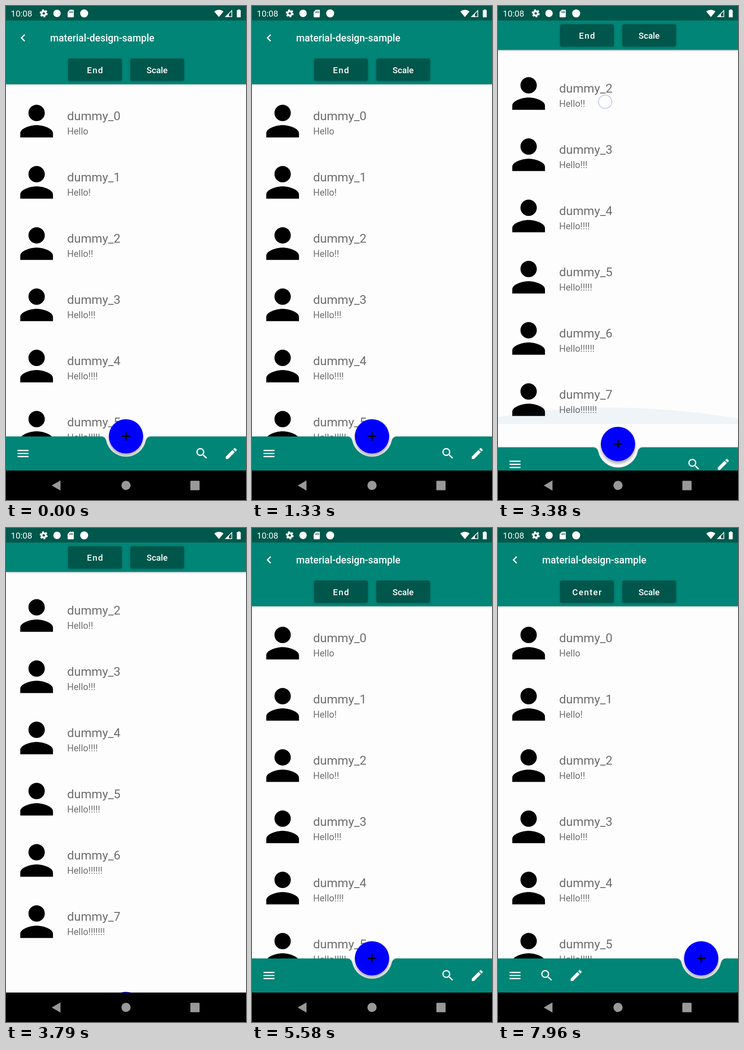
An HTML page that plays this animation: 522x1073 px, repeating every 8000 ms.

```html
<!DOCTYPE html>
<html lang="en">
<head>
<meta charset="utf-8">
<title>Material design sample</title>
<style>
  html, body { margin: 0; width: 100%; height: 100%; overflow: hidden; background: #000; }
  svg { display: block; width: 100%; height: 100%; font-family: Roboto, sans-serif; }
  .medium { font-weight: 500; fill: #fff; }
  .name { font-size: 26.67px; fill: #6e6e6e; }
  .note { font-size: 20px; fill: #6e6e6e; }
</style>
</head>
<body>
<svg viewBox="0 0 522 1073">
  <defs>
    <path id="person" d="M12 12c2.21 0 4-1.79 4-4s-1.79-4-4-4-4 1.79-4 4 1.79 4 4 4zm0 2c-2.67 0-8 1.34-8 4v2h16v-2c0-2.66-5.33-4-8-4z"/>
    <filter id="blur" x="-30%" y="-30%" width="160%" height="160%"><feGaussianBlur stdDeviation="2.6"/></filter>
    <filter id="lift" x="-5%" y="-20%" width="110%" height="140%">
      <feDropShadow dx="0" dy="1" stdDeviation="2" flood-opacity=".26"/>
    </filter>
  </defs>

  <rect width="522" height="1073" fill="#fdfdfd"/>
  <g id="list"></g>
  <path id="bottomGlow" d="M0 908V893Q240 850 522 896V908Z" fill="#006ea0"/>
  <path id="topGlow" d="M0 170V174Q261 194 522 174V170Z" fill="#006ea0"/>

  <g id="fabShadow"><circle cy="5" r="38" opacity=".27" filter="url(#blur)"/></g>
  <g id="bar">
    <path id="barShape" fill="#008577" filter="url(#lift)"/>
    <g fill="#fff">
      <path transform="translate(21 956) scale(1.333)" d="M3 18h18v-2H3v2zm0-5h18v-2H3v2zm0-7v2h18V6H3z"/>
      <g id="menu">
        <path transform="translate(410 956) scale(1.333)" d="M15.5 14h-.79l-.28-.27A6.47 6.47 0 0 0 16 9.5 6.5 6.5 0 1 0 9.5 16c1.61 0 3.09-.59 4.23-1.57l.27.28v.79l5 4.99L20.49 19l-4.99-5zm-6 0a4.5 4.5 0 1 1 0-9 4.5 4.5 0 0 1 0 9z"/>
        <path transform="translate(474 956) scale(1.333)" d="M3 17.25V21h3.75L17.81 9.94l-3.75-3.75L3 17.25zM20.71 7.04a1 1 0 0 0 0-1.41l-2.34-2.34a1 1 0 0 0-1.41 0l-1.83 1.83 3.75 3.75 1.83-1.83z"/>
      </g>
    </g>
  </g>
  <g id="fab">
    <circle r="37.3" fill="#00f"/>
    <path d="M-9.3 0H9.3M0-9.3V9.3" stroke="#000" stroke-width="2.67"/>
  </g>

  <g id="header">
    <rect y="20" width="522" height="150" fill="#008577" filter="url(#lift)"/>
    <path transform="translate(21 53.3) scale(1.333)" fill="#fff" d="M15.41 7.41 14 6l-6 6 6 6 1.41-1.41L10.83 12z"/>
    <text class="medium" x="96" y="77" font-size="21.33">material-design-sample</text>
    <g fill="#00574b" filter="url(#lift)">
      <rect x="135" y="114" width="117" height="48.5" rx="4"/>
      <rect x="270.3" y="114" width="117" height="48.5" rx="4"/>
    </g>
    <g class="medium" font-size="18.67" text-anchor="middle">
      <text id="mode" x="194.3" y="145.6" letter-spacing="1.67"></text>
      <text x="328.6" y="145.6">Scale</text>
    </g>
  </g>

  <rect width="522" height="31.5" fill="#00574b"/>
  <g fill="#fff">
    <text x="10.5" y="23" font-size="18.67">10:08</text>
    <g fill="none" stroke="#fff">
      <circle cx="82" cy="16" r="4.6" stroke-width="4"/>
      <circle cx="82" cy="16" r="7" stroke-width="3.4" stroke-dasharray="3.9 3.43"/>
    </g>
    <circle cx="111" cy="16" r="8"/>
    <path d="M139 8H146Q147.5 8 147.5 9.500V23Q147.500 24.500 146 24.500H135.500Q134 24.500 134 23V13Z"/>
    <path d="M139 11.500V15M141.800 11.500V15M144.600 11.500V15" stroke="#00574b" stroke-width="1.5"/>
    <circle cx="170" cy="16" r="8.7"/>
    <path d="M463 24 453 12Q463 4.500 473 12Z"/>
    <path d="M478 23.200 491.200 10V23.200Z" fill="none" stroke="#fff" stroke-width="1.6"/>
    <path d="M476 24 485 15V24Z"/>
    <path d="M504.500 7.500H508.500V9H510.500V24.500H502V9H504.500Z"/>
  </g>

  <rect y="1009" width="522" height="64"/>
  <g fill="#999">
    <path d="M99.500 1041.500 118.500 1030.500V1052.500Z"/>
    <circle cx="261" cy="1041.300" r="10"/>
    <rect x="401" y="1031.300" width="20" height="20.500" rx="1.500"/>
  </g>
  <circle id="touch" r="14.5" stroke-width="2"/>
</svg>

<script>
const LOOP = 8000, SCROLL_MAX = 326, HEADER_HIDE = 74.5, BAR_HIDE = 110;
const BAR_TOP = 935, FAB_CENTER = 261, FAB_END = 442, MENU_SHIFT = -320;
const el = id => document.getElementById(id);
const ramp = (t, a, b) => Math.min(1, Math.max(0, (t - a) / (b - a)));
const smooth = p => p * p * (3 - 2 * p);
const mix = (a, b, p) => a + (b - a) * p;
const set = (id, attrs) => {
  for (const [key, value] of Object.entries(attrs)) el(id).setAttribute(key, value);
};

el('list').innerHTML = Array.from({ length: 8 }, (_, i) => `
  <g transform="translate(0 ${133 * i})">
    <use href="#person" transform="translate(13.3 196.6) scale(4.444)"/>
    <text class="name" x="133" y="248">dummy_${i}</text>
    <text class="note" x="133" y="279">Hello${'!'.repeat(i)}</text>
  </g>`).join('');

const swipeUp = t => smooth(ramp(t, 3230, 3380));
const scrollAt = t => SCROLL_MAX * (swipeUp(t) - smooth(ramp(t, 3850, 4250)));

// The bar accelerates out of view and decelerates back in.
const barOffset = t => t < 3800
  ? BAR_HIDE * ramp(t, 3300, 3475) ** 2
  : BAR_HIDE * (1 - ramp(t, 3880, 4105)) ** 2;

const fabScale = t => t < 6550
  ? 1 - ramp(t, 6420, 6520)
  : smooth(ramp(t, 6580, 6730));

// Bar outline with a rounded cradle; open = 0 is a flat edge.
function barPath(x, open) {
  if (open <= 0) return `M0 ${BAR_TOP}H522V1012H0Z`;
  const R = 44, r = 10.67, D = R + r;
  const lift = (1 - open) * R, dy = Math.min(D, lift + r);
  const dx = Math.sqrt(D * D - dy * dy);
  const touchX = dx * R / D, touchY = BAR_TOP - lift + dy * R / D;
  return `M0 ${BAR_TOP}H${x - dx}A${r} ${r} 0 0 1 ${x - touchX} ${touchY}` +
    `A${R} ${R} 0 0 0 ${x + touchX} ${touchY}` +
    `A${r} ${r} 0 0 1 ${x + dx} ${BAR_TOP}H522V1012H0Z`;
}

function touchAt(t) {
  if (t >= 2540 && t < 3430) {
    const p = swipeUp(t);
    return { x: mix(230, 233, p), y: mix(510, 208, p), alpha: 1 };
  }
  if (t >= 3820 && t < 4080) {
    return { x: 240, y: mix(330, 640, smooth(ramp(t, 3850, 4080))), alpha: 1 };
  }
  if (t >= 6330 && t < 6600) return { x: 171, y: 145, alpha: 1, dark: true };
  return { x: 0, y: 0, alpha: 0 };
}

function draw(t) {
  const scroll = scrollAt(t), ended = t >= 6550;
  const scale = fabScale(t), fabX = ended ? FAB_END : FAB_CENTER;

  set('list', { transform: `translate(0 ${-scroll})` });
  set('header', { transform: `translate(0 ${-Math.min(scroll, HEADER_HIDE)})` });
  set('bottomGlow', { opacity: 0.06 * ramp(t, 3340, 3380) * (1 - ramp(t, 3400, 3800)) });
  set('topGlow', { opacity: 0.06 * ramp(t, 4230, 4300) * (1 - ramp(t, 4350, 4850)) });

  set('bar', { transform: `translate(0 ${barOffset(t)})` });
  set('barShape', { d: barPath(fabX, scale) });
  // The button trails the bar slightly.
  const fabPlace = `translate(${fabX} ${BAR_TOP - 0.3 + barOffset(t - 13)}) scale(${scale})`;
  set('fab', { transform: fabPlace });
  set('fabShadow', { transform: fabPlace });

  set('menu', {
    transform: `translate(${t < 6700 ? 0 : MENU_SHIFT} 0)`,
    opacity: t < 6700 ? 1 - ramp(t, 6550, 6700) : ramp(t, 6700, 6850)
  });
  el('mode').textContent = t < 6420 ? 'End' : 'Center';

  const touch = touchAt(t);
  set('touch', {
    cx: touch.x, cy: touch.y, opacity: touch.alpha,
    fill: touch.dark ? 'rgba(255,255,255,.15)' : 'rgba(255,255,255,.3)',
    stroke: touch.dark ? 'rgba(255,255,255,.04)' : 'rgba(165,175,230,.6)'
  });
}

const start = performance.now();
function tick() {
  draw((performance.now() - start) % LOOP);
  requestAnimationFrame(tick);
}
tick();
</script>
</body>
</html>
```
